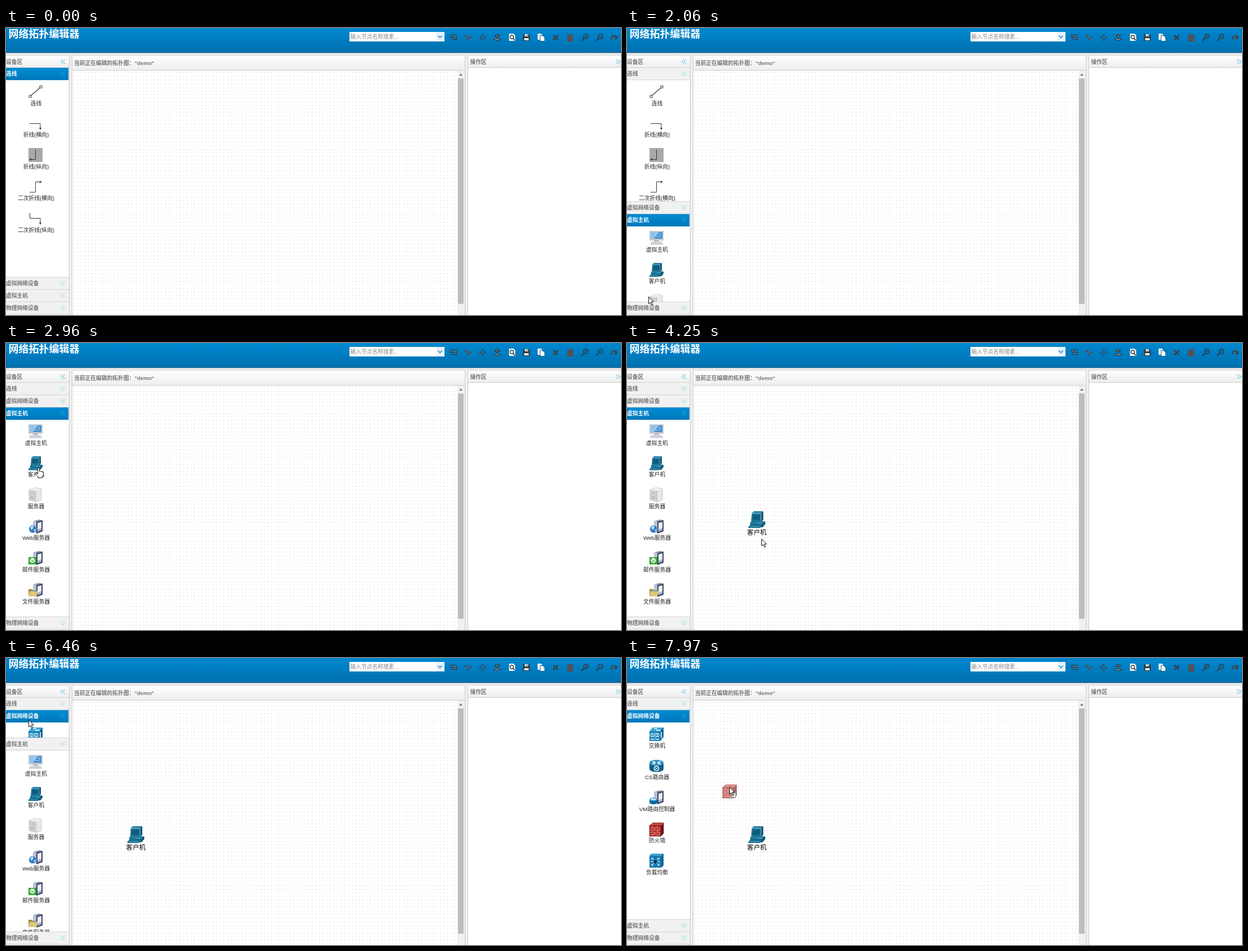
An HTML page with a canvas that plays this animation: 1094 by 512 pixels, repeating every 8 s.

```html
<!DOCTYPE html>
<html lang="zh-CN">
<head>
<meta charset="utf-8">
<title>网络拓扑编辑器</title>
<style>
  html, body { margin: 0; width: 100%; height: 100%; overflow: hidden; }
  canvas { display: block; width: 100vw; height: 100vh; }
</style>
</head>
<body>
<canvas id="stage" width="1094" height="512"></canvas>
<script>
const LOOP = 8000, SIDE = 112, ROW = 22, BOTTOM = 489;
const ZOOM = 0.815, SMALL = 12 * ZOOM, GRID = 8 * ZOOM;
const stage = document.getElementById('stage');
const backdrop = document.createElement('canvas');
backdrop.width = stage.width;
backdrop.height = stage.height;
let ctx = backdrop.getContext('2d');

// ---------- drawing helpers ----------
function rect(x, y, w, h, fill) {
  ctx.fillStyle = fill;
  ctx.fillRect(x, y, w, h);
}
function fade(x, y, w, h, top, bottom) {
  const g = ctx.createLinearGradient(0, y, 0, y + h);
  g.addColorStop(0, top);
  g.addColorStop(1, bottom);
  rect(x, y, w, h, g);
}
function text(str, x, middle, size, color, weight = 'normal', align = 'left') {
  ctx.font = `${weight} ${size}px "Liberation Sans", "Noto Sans CJK SC", "Noto Sans CJK JP", sans-serif`;
  ctx.textAlign = align;
  ctx.fillStyle = color;
  ctx.fillText(str, x, middle + size * 0.38);
}
// A shape is [color, path] when filled, [color, path, lineWidth] when stroked.
function shapes(list, x, y, scale = 1, angle = 0) {
  ctx.save();
  ctx.translate(x, y);
  ctx.rotate(angle);
  ctx.scale(scale, scale);
  for (const [color, path, width] of list) {
    const p = new Path2D(path);
    if (width) {
      ctx.strokeStyle = color;
      ctx.lineWidth = width;
      ctx.stroke(p);
    } else {
      ctx.fillStyle = color;
      ctx.fill(p);
    }
  }
  ctx.restore();
}
const disc = (x, y, r) => `M${x - r} ${y}a${r} ${r} 0 1 0 ${2 * r} 0a${r} ${r} 0 1 0 ${-2 * r} 0Z`;
function chevrons(x, y, angle, color) {
  shapes([[color, 'M-4 -4L0 -0.5L4 -4M-4 0L0 3.5L4 0', 1]], x, y, 1, angle);
}

// ---------- icons in a 25 x 25 box ----------
const INK = '#333';
const cabinet = [
  ['#8b95ad', 'M8 3L18 0L25 1L15 4Z'],
  ['#b9c2d6', 'M8 3L15 4V25L8 21Z'],
  ['#39435f', 'M14 4L25 1V21L14 25Z'],
  ['#eef1f9', 'M16 6L23 4V15L16 18Z'],
  ['#aeb9d4', 'M16 18L23 15V19L16 22Z']
];
const miniRouter = [
  ['#0b6799', 'M0 16V22C0 26 14 26 14 22V16Z'],
  ['#5cb2de', 'M0 16C0 12 14 12 14 16C14 20 0 20 0 16Z'],
  ['#fff', 'M3 15L11 17M11 15L3 17', 1]
];
const icons = {
  line: [
    [INK, 'M5 19L20 6', 1.1],
    ['#fff', 'M1 19H5V23H1ZM20 2H24V6H20Z'],
    [INK, 'M1 19H5V23H1ZM20 2H24V6H20Z', 1]
  ],
  elbowH: [[INK, 'M2 12.5H21V22', 1], [INK, 'M19 20H23L21 24Z']],
  elbowV: [['#a9a9a9', 'M0 0H25V25H0Z'], [INK, 'M12.5 3V20.5H3', 1], [INK, 'M5 18.5V22.5L1 20.5Z']],
  doubleH: [[INK, 'M2 22H12.5V3.5H22', 1], [INK, 'M20 1.5V5.5L24 3.5Z']],
  doubleV: [[INK, 'M2.5 3V12.5H21V22', 1], [INK, 'M19 20H23L21 24Z']],
  pc: [
    ['#c3c9d0', 'M0 0H25V17H0Z'],
    ['#4a90cf', 'M2 2H23V14H2Z'],
    ['#8fc3ee', 'M2 2H16L8 14H2Z'],
    ['#cfe6f8', 'M11 5H19V10H11Z', 0.7],
    ['#b4bac0', 'M8 17H17V19H8Z'],
    ['#dcdfe3', 'M3 19H22L25 25H0Z'],
    ['#b1b7bd', 'M3 21H22M2 23H23', 0.7]
  ],
  client: [
    ['#2b83a6', 'M8 0H21L19 3H5Z'],
    ['#0b4f6e', 'M21 0L22 1V13L19 16V3Z'],
    ['#1a7397', 'M5 3H19V16H4Z'],
    ['#0e5c7e', 'M7 5H17V13H6.5Z'],
    ['#0b4f6e', 'M3 16H25V19L21 24H3Z'],
    ['#1f7ca0', 'M5 15H25L21 19H2Z'],
    ['#13688b', 'M3 19H21V22H3Z'],
    ['#17708f', 'M0 23L3 20H19L17 25H0Z'],
    ['#8abfd4', 'M5 3.4H19V14M13 18H20M2 23H16', 0.6]
  ],
  server: [
    ['#d2d4d6', 'M1 4L13 2V25L1 22Z'],
    ['#f4f4f4', 'M1 4L11 0L23 2L13 5Z'],
    ['#e7e8e9', 'M13 5L23 2V22L13 25Z'],
    ['#a6a9ac', 'M3 8L11 9M3 11L11 12M3 16L11 17M3 19L11 20M5 15V21M8 15V21M13 5V25', 0.7],
    ['#b5b7b9', 'M1 4L11 0L23 2V22L13 25L1 22Z', 0.7]
  ],
  web: [...cabinet,
    ['#2c78bd', disc(7.5, 17, 7)],
    ['#b9dcf5', 'M3 13L8 11L9 15L5 19ZM9 18L13 17L11 22Z'],
    ['#e4f3ff', disc(7.5, 17, 6.6), 0.7]],
  mail: [...cabinet,
    ['#32a82f', 'M0 11H14V24H0Z'],
    ['#f3fff0', disc(7, 17, 4.5)],
    ['#32a82f', 'M4 15L7 18L10 15M4 19H10', 1]],
  file: [...cabinet,
    ['#a68c37', 'M0 11H6L8 13H15V24H0Z'],
    ['#dec878', 'M2 15H17L14 24H0Z'],
    ['#8eb2cc', 'M4 14H13V16H4Z']],
  switch: [
    ['#0a6294', 'M0 8L6 1H25V18L19 25H0Z'],
    ['#3ba3d6', 'M0 8L6 1H25L19 8Z'],
    ['#1581b8', 'M0 8H19V25H0Z'],
    ['#fff', 'M8 3H14M12 6H20M2 12H8M11 12H17M2 17H8M11 17H17M2 22H8M11 22H17M21 9V20', 1.6],
    ['#fff', 'M9.5 10V23M0 14.5H19', 0.7]
  ],
  router: [
    ['#0a5f8c', 'M0 7V18C0 25 25 25 25 18V7Z'],
    ['#2c8fc0', 'M0 7C0 0 25 0 25 7C25 14 0 14 0 7Z'],
    ['#fff', 'M5 4L11 6M20 4L14 6M5 10L11 8M20 10L14 8M9 4V7H5M16 10V7H20', 1.3],
    ['#fff', disc(12.5, 17, 4.2), 1.4],
    ['#fff', 'M10 19L15 15M10 15L15 19', 1]
  ],
  control: [...cabinet, ...miniRouter],
  firewall: [
    ['#c8473c', 'M0 6L6 1H25L20 6Z'],
    ['#b0221b', 'M0 6H20V25H0Z'],
    ['#7a1512', 'M20 6L25 1V20L20 25Z'],
    ['#eebbb4', 'M0 10H20M0 14H20M0 18H20M0 22H20M5 6V10M14 6V10M9 10V14M18 10V14M5 14V18M14 14V18M9 18V22M18 18V22M5 22V25M14 22V25', 0.8],
    ['#4c0d0b', 'M0 6L6 1H25V20L20 25H0ZM0 6H20V25M20 10L25 5M20 14L25 9M20 18L25 13M20 22L25 17', 0.6]
  ],
  balance: [
    ['#0a6497', 'M0 4L4 0H25V21L21 25H0Z'],
    ['#3ba0d0', 'M0 4L4 0H25L21 4Z'],
    ['#147bb2', 'M0 4H21V25H0Z'],
    ['#fff', 'M4 8L17 21M17 8L4 21M2 14.5H19M4 11V8H7M14 8H17V11M4 18V21H7M14 21H17V18', 1],
    ['#08334d', disc(10.5, 14.5, 3)]
  ]
};

// ---------- toolbar ----------
const DARK = '#30383f', BROWN = '#5a4a48';
const lens = [
  [DARK, disc(2, -2, 4), 1.6],
  [DARK, 'M-1 1L-6 6', 2.2]
];
const page = ['#f4f4f4', 'M-5 -7H3L6 -4V6H-5Z'];
const tools = [
  [[DARK, 'M-6 -4H-1V0H-6ZM1 -3H6V4H1Z'], ['#a9bcc8', 'M-5 -2.5H-2M2 -1.5H5M2 1.5H5', 1],
   [DARK, 'M-6 -5H6M-4 0V4H1', 0.8]],
  [[BROWN, 'M-6 -4H-2V-1H-6ZM2 -2H6V1H2ZM-2 2H2V5H-2Z'], [BROWN, 'M-2 -2L2 0M-4 -1L-1 3', 0.9]],
  [['#314f64', 'M0 -7L3 -3H-3ZM0 7L3 3H-3ZM-7 0L-3 -3V3ZM7 0L3 -3V3Z'], ['#314f64', disc(0, 0, 1.2)]],
  [[DARK, 'M-4 -5H4V-1H-4ZM-6 2H6V5H-6Z'], [DARK, 'M0 -7V7', 1], ['#b7c4cc', 'M-2 -3H2M-4 3.5H4', 1]],
  [page, [DARK, disc(0, -1, 3), 1.3], [DARK, 'M2 1L5 5', 1.8]],
  [[DARK, 'M-6 -6H4L6 -4V6H-6Z'], ['#dfe7ec', 'M-3 -6H3V-2H-3ZM-4 1H4V5H-4Z'], [DARK, 'M1 -5V-3', 1.2]],
  [['#f4f4f4', 'M-6 -7H0L2 -5V4H-6Z'], ['#23658f', 'M-2 -4H4L7 -1V7H-2Z'], ['#fff', 'M-1 -3H3L6 0V6H-1Z']],
  [['#3b3f44', 'M-4 -4L4 4M4 -4L-4 4', 2.6]],
  [[BROWN, 'M-6 -6H6V-4H-6ZM-5 -3H5V7H-5Z'], ['#6a5a5b', 'M-2 -1V5M2 -1V5', 1]],
  [...lens, [DARK, 'M0 -2H4M2 -4V0', 1]],
  [...lens, [DARK, 'M0 -2H4', 1]],
  [['#3f4348', 'M-5 4C-5 -4 2 -4 4 -1', 2.4], ['#3f4348', 'M6 -4V3H-1Z']]
];

function panel(x, w, headerHeight) {
  rect(x, 48, w, 464, '#ccc');
  fade(x + 1, 49, w - 2, headerHeight, '#fff', '#eee');
  rect(x + 1, 50 + headerHeight, w - 2, 512, '#fff');
}

function drawBackdrop() {
  rect(0, 0, 1094, 512, '#efefef');
  fade(0, 0, 1094, 44, '#0088d0', '#006fae');
  rect(0, 43, 1094, 1, '#00649d');
  rect(0, 44, 1094, 1, '#8a9aa5');
  text('网络拓扑编辑器', 4.5, 10.5, 18, '#fff', 900);

  rect(611, 7, 169, 17, '#fff');
  rect(766, 7, 14, 17, '#e6f2f9');
  text('输入节点名称搜素...', 612.5, 15.5, SMALL, '#888');
  shapes([['#2b95cc', 'M-3.5 -2L0 2L3.5 -2', 1.8]], 772, 15.5);
  tools.forEach((tool, i) => shapes(tool, 796 + 25.95 * i, 17));

  panel(-1, SIDE + 2, 21);
  text('设备区', 0, 60, SMALL, '#777', 'bold');
  chevrons(101, 60, Math.PI / 2, '#45b4e2');

  panel(117, 700, 26);
  text('当前正在编辑的拓扑图："demo"', 121, 62, SMALL, '#777', 'bold');
  for (let y = 79; y < 511; y += GRID)
    for (let x = 120; x < 802; x += GRID) rect(Math.round(x), Math.round(y), 1, 1, '#c4c2bf');
  rect(803, 76, 13, 436, '#f1f1f1');
  rect(804, 90, 10, 402, '#bdbdbd');
  shapes([['#777', 'M-3 2H3L0 -2Z']], 809, 83);

  panel(821, 274, 21);
  text('操作区', 825.5, 60, SMALL, '#777', 'bold');
  chevrons(1089, 60, -Math.PI / 2, '#45b4e2');
}

// ---------- sidebar ----------
const groups = [
  ['连线', [['line', '连线'], ['elbowH', '折线(横向)'], ['elbowV', '折线(纵向)'],
    ['doubleH', '二次折线(横向)'], ['doubleV', '二次折线(纵向)']]],
  ['虚拟网络设备', [['switch', '交换机'], ['router', 'CS路由器'], ['control', 'VM路由控制器'],
    ['firewall', '防火墙'], ['balance', '负载均衡']]],
  ['虚拟主机', [['pc', '虚拟主机'], ['client', '客户机'], ['server', '服务器'],
    ['web', 'Web服务器'], ['mail', '邮件服务器'], ['file', '文件服务器']]],
  ['物理网络设备', []]
];

function drawBody(items, top, bottom) {
  if (bottom <= top) return;
  ctx.save();
  ctx.beginPath();
  ctx.rect(0, top, SIDE, bottom - top);
  ctx.clip();
  rect(0, top, SIDE, bottom - top, '#fff');
  items.forEach(([icon, label], i) => {
    const y = top + 56.6 * i;
    shapes(icons[icon], 40, Math.round(y + 8));
    text(label, 53.5, Math.round(y + 40.5), SMALL, '#222', 'normal', 'center');
  });
  ctx.restore();
}
function drawHeader(label, y, selected) {
  rect(0, y - 1, SIDE, ROW + 1, '#d4d4d4');
  if (selected) fade(0, y, SIDE - 1, ROW, '#008bd3', '#0078bb');
  else rect(0, y, SIDE, ROW - 1, '#f1f1f1');
  text(label, 0, y + 10.5, SMALL, selected ? '#fff' : '#777', 'bold');
  chevrons(101, y + 10.5, selected ? Math.PI : 0, selected ? '#2fb0e4' : '#7edce4');
}
function swing(p) {
  return 0.5 - Math.cos(Math.PI * Math.min(1, Math.max(0, p))) / 2;
}
function drawSidebar(t) {
  const hostOpen = swing((t - 1882) / 400), networkOpen = swing((t - 6387) / 400);
  const networkY = Math.round(445 - 352 * hostOpen);
  const hostY = Math.round(networkY + ROW + 352 * networkOpen);
  const tops = [71, networkY, hostY, BOTTOM];
  const selected = t < 1900 ? 0 : t < 6460 ? 2 : 1;
  groups.forEach(([, items], i) => drawBody(items, tops[i] + ROW, tops[i + 1] ?? 0));
  // The open header goes last so that its neighbour's border does not cover it.
  const drawAt = i => drawHeader(groups[i][0], tops[i], i === selected);
  tops.forEach((_, i) => i !== selected && drawAt(i));
  drawAt(selected);
}

// ---------- pointer ----------
const ARROW = 0, HAND = 1, DRAG = 2;
const route = [
  [230, 889, 500, ARROW], [303, 560, 440, ARROW], [377, 230, 405, ARROW], [450, 132, 397, ARROW],
  [690, 132, 397, ARROW], [1100, 60, 450, HAND], [1360, 38, 479, HAND],
  [1890, 38, 479, ARROW], [2060, 38, 479, ARROW], [2300, 41, 400, ARROW], [2660, 52, 201, HAND],
  [2960, 58, 223, HAND], [3020, 75, 232, DRAG], [3270, 254, 306, DRAG], [3410, 250, 290, DRAG],
  [3640, 265, 315, DRAG], [3890, 264, 305, ARROW], [4250, 239, 349, ARROW], [4630, 221, 335, ARROW],
  [5450, 34, 108, HAND], [5620, 34, 90, HAND], [6070, 37, 96, HAND], [6460, 40, 110, ARROW],
  [6757, 74, 241, ARROW], [6980, 51, 304, HAND], [7150, 62, 300, DRAG], [7500, 130, 255, DRAG],
  [7816, 175, 231, DRAG], [7890, 174, 238, DRAG], [7970, 182, 230, DRAG]
];
const arrow = 'M0.5 0.5V13L3.4 10.4L5.6 15.4L7.6 14.5L5.4 9.6H9.2Z';
const hand = 'M-1.5 12V2Q0 -0.5 1.5 2V7Q3 6 4 7.5Q5.5 6.5 6.5 8Q8.5 7.5 8.5 9.5V13L6.5 16V18.5H-1V16.5L-5.5 11.5Q-5.5 8.5 -3 10Z';
const pointers = [arrow, hand, arrow].map(p => [['#fff', p], ['#111', p, 1]]);
const badge = [['#eee', 'M0 0H9V9H0Z'], ['#888', 'M0.5 0.5H8.5V8.5H0.5ZM2 7L7 2', 1]];

function drawPointer(t) {
  const next = route.findIndex(key => key[0] > t);
  if (next === 0) return;
  const a = route.at(next < 0 ? -1 : next - 1), b = next < 0 ? a : route[next];
  const p = a === b ? 0 : (t - a[0]) / (b[0] - a[0]);
  const x = Math.round(a[1] + (b[1] - a[1]) * p), y = Math.round(a[2] + (b[2] - a[2]) * p);
  if (a[3] === DRAG) {
    ctx.globalAlpha = 0.6;
    shapes(icons[t < 5000 ? 'client' : 'firewall'], x - 12, y - 5);
    ctx.globalAlpha = 1;
    shapes(badge, x + 3, y + 10);
  }
  shapes(pointers[a[3]], x, y);
}

// ---------- clock ----------
// Bursts of movement: [first step, last step, number of steps]; the picture rests in between.
const bursts = [
  [0, 0, 1], [230, 450, 4], [760, 1360, 9], [1900, 2660, 11], [2720, 3410, 10], [3640, 3640, 1],
  [3890, 4630, 11], [4710, 5450, 11], [5530, 5620, 2], [6070, 6070, 1], [6460, 6980, 8],
  [7150, 7890, 11], [7970, 7970, 1]
];
function stepped(t) {
  const [first, last, steps] = bursts.findLast(burst => burst[0] <= t);
  if (steps === 1) return first;
  const gap = (last - first) / (steps - 1);
  return Math.min(last, first + Math.floor((t + 10 - first) / gap) * gap);
}

drawBackdrop();
ctx = stage.getContext('2d');
const start = performance.now();

function frame() {
  const t = stepped((performance.now() - start) % LOOP);
  ctx.drawImage(backdrop, 0, 0);
  drawSidebar(t);
  if (t >= 3890) {
    shapes(icons.client, 216, 300, 1.2);
    text('客户机', 231, 337.5, 11.6, '#000', 'normal', 'center');
  }
  drawPointer(t);
  requestAnimationFrame(frame);
}
frame();
</script>
</body>
</html>
```
